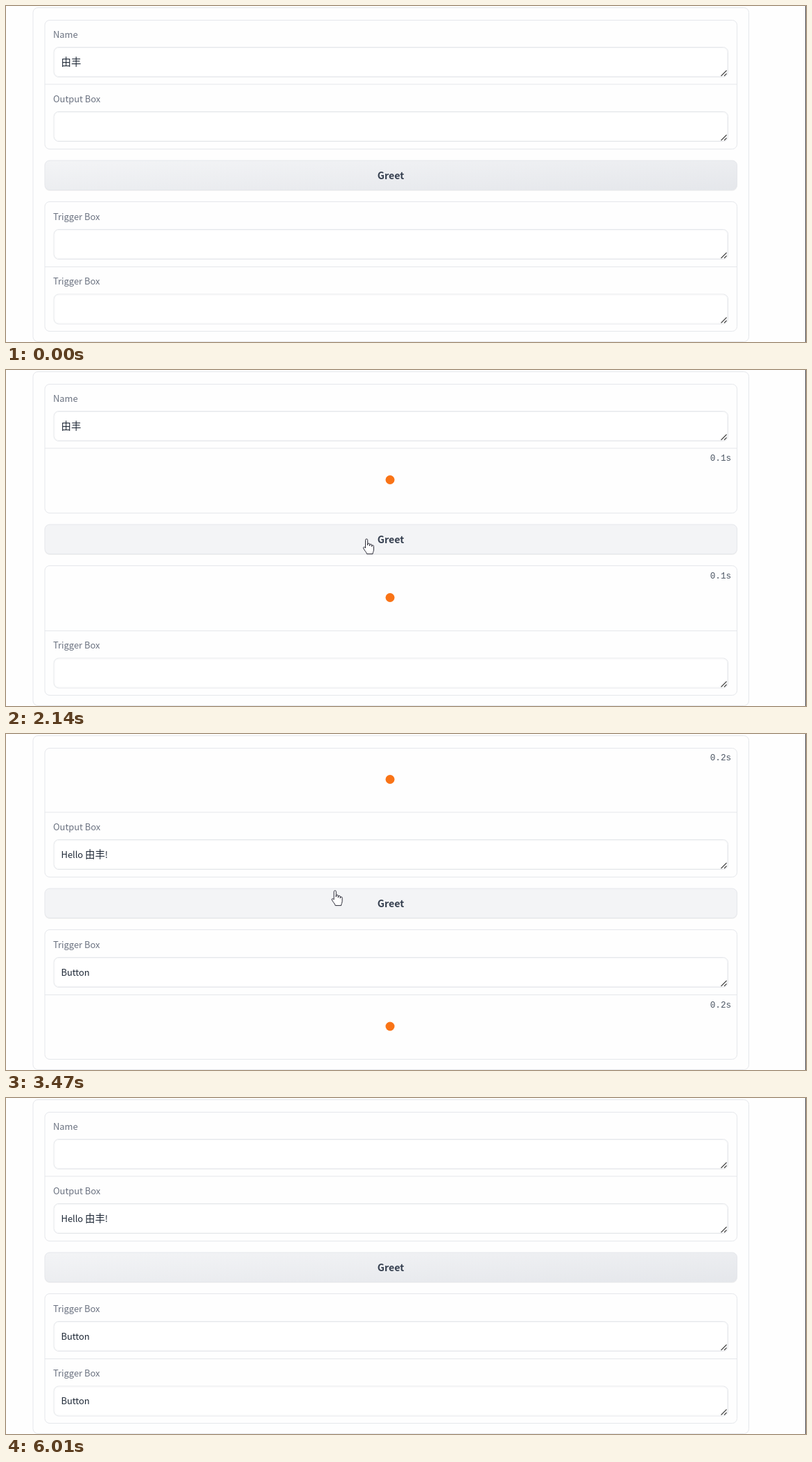
These frames come from a looping animation (1154x485 px, 6040 ms). An HTML page:

```html
<!DOCTYPE html>
<html lang="en">
<head>
<meta charset="utf-8">
<title>Greeting form</title>
<style>
  html, body { margin: 0; width: 100%; height: 100%; overflow: hidden; background: #fefefe; }
  svg { display: block; width: 1154px; height: 485px; }
  text { font-family: "Noto Sans CJK SC", "Noto Sans CJK JP", "Noto Sans CJK", sans-serif; font-size: 12.9px; fill: #1f2937; }
  .label { fill: #6b7280; }
  .cjk { font-size: 14.4px; }
  .greet { font-size: 14.2px; font-weight: 600; fill: #374151; text-anchor: middle; }
  .timer { font: 12.6px "Liberation Mono", monospace; fill: #4b5563; text-anchor: end; }
  .line { fill: none; stroke: #e5e7eb; }
  .field { fill: #fff; stroke: #e5e7eb; }
  .inner { fill: none; stroke: #f5f6f7; }
  .grip { fill: none; stroke: #444; stroke-width: 1.1; }
  .pointer { fill: #fff; stroke: #2c2c38; stroke-linejoin: round; }
</style>
</head>
<body>
<svg id="stage" viewBox="0 0 1154 485">
  <defs>
    <linearGradient id="shade" x1="0" y1="0" x2="1" y2="1">
      <stop offset="0" stop-color="#f3f4f6"/><stop offset="1" stop-color="#e5e7eb"/>
    </linearGradient>
  </defs>
</svg>
<script>
const LOOP = 6040;
const NAME = "由丰";
const svg = document.getElementById("stage");

function add(tag, attrs, parent = svg, text = "") {
  const el = document.createElementNS("http://www.w3.org/2000/svg", tag);
  for (const key in attrs) el.setAttribute(key, attrs[key]);
  el.textContent = text;
  parent.append(el);
  return el;
}
const rect = (x, y, width, height, attrs, parent) =>
  add("rect", { x, y, width, height, rx: 7, ...attrs }, parent);
const show = (el, on) => el.setAttribute("visibility", on ? "visible" : "hidden");
const between = (t, a, b) => t >= a && t < b;
const clamp = v => Math.max(0, Math.min(1, v));

// Page frame and groups
rect(39, 2.5, 1032.5, 482, { class: "line" });
rect(1153, 0, 1, 485, { fill: "#4a4a50", rx: 0 });
for (const [y, h, mid] of [[20.5, 186, 113], [282.5, 187, 376.5]]) {
  rect(56, y, 998.5, h, { class: "line" });
  add("path", { class: "line", d: `M56 ${mid}H1054` });
}

// Greet button
rect(56, 223.5, 998.5, 43.5, { fill: "#000", opacity: .05 });
const button = rect(56, 223, 998.5, 42.5, { stroke: "#e5e7eb" });
add("text", { class: "greet", x: 555, y: 250 }, svg, "Greet");

// A labelled text area that can be swapped for a loading view
function makeRow(label, top) {
  const form = add("g", {}), busy = add("g", {});
  add("text", { class: "label", x: 68, y: top - 13.6 }, form, label);
  const ring = rect(67, top - 1.5, 976, 46, { fill: "none", stroke: "#bfdbfe", "stroke-width": 3, rx: 9 }, form);
  rect(69, top, 972.5, 43, { class: "field" }, form);
  rect(70, top + 1, 970.5, 41, { class: "inner", rx: 6 }, form);
  const edge = rect(69, top, 972.5, 43, { fill: "none", stroke: "#93c5fd" }, form);
  add("path", { class: "grip", d: `M1031.5 ${top + 41.5}l8-8m-3.5 8l3.5-3.5` }, form);
  const value = add("text", { x: 79.5, y: top + 26.3 }, form);
  add("circle", { cx: 554, cy: top + 6, r: 6.5, fill: "#f97316" }, busy);
  const timer = add("text", { class: "timer", x: 1046, y: top - 21.3 }, busy);
  return { form, busy, ring, edge, value, timer };
}

function setRow(row, text, seconds, focus = 0) {
  const loading = seconds !== null;
  show(row.form, !loading);
  show(row.busy, loading);
  row.ring.setAttribute("opacity", focus * .5);
  row.edge.setAttribute("opacity", focus);
  if (loading) row.timer.textContent = seconds.toFixed(1) + "s";
  if (row.text === text) return;
  row.text = text;
  row.value.textContent = "";
  for (const part of text.split(NAME).flatMap((s, i) => i ? [NAME, s] : [s]))
    if (part) add("tspan", part === NAME ? { class: "cjk" } : {}, row.value, part);
}

const name = makeRow("Name", 59.5);
const output = makeRow("Output Box", 152.5);
const first = makeRow("Trigger Box", 322.5);
const second = makeRow("Trigger Box", 416);
const caret = rect(108.3, 72, 1.2, 18, { fill: "#111", rx: 0 });

// Pointer shapes, hotspot at 0,0
const pointers = {
  arrow: add("path", { class: "pointer", d: "M0 0V16.5L4 12.8 6.6 18.8 9 17.8 6.5 12H12Z" }),
  hand: add("path", { class: "pointer", d: "M-1.5 13V1.5a1.6 1.6 0 0 1 3.2 0V9V7.6a1.5 1.5 0 0 1 3 .2V10V8.8a1.5 1.5 0 0 1 3 .2V11V10.2a1.4 1.4 0 0 1 2.8 .4V15c0 3-1.5 4-1.5 6.5H.5c0-2-4.3-6-5-8.5c-.4-1.6 1.8-2 3 0Z" }),
  beam: add("path", { fill: "none", stroke: "#dedee2", d: "M-4-8.5h3l1 1l1-1h3M-4 8.5h3l1-1l1 1h3M0-7.5v15" })
};

// time, x, y
const track = [
  [310, 430, 500], [900, 293, 91], [1369, 293, 91], [1370, 293, 116],
  [1730, 520, 244], [2570, 520, 244], [2860, 508, 221], [3790, 462, 228],
  [4390, 461, 230], [5320, 461, 230], [5600, 430, 500]
];

function pointerAt(t) {
  const i = track.findIndex(k => k[0] > t);
  if (i < 1) return null;
  const [t0, x0, y0] = track[i - 1], [t1, x1, y1] = track[i];
  const u = (t - t0) / (t1 - t0), e = u * u * (3 - 2 * u);
  return [x0 + (x1 - x0) * e, y0 + (y1 - y0) * e];
}

function pointerKind(y) {
  if (between(y, 222.5, 266)) return "hand";
  return [59, 152, 322, 416].some(top => between(y, top, top + 60)) ? "beam" : "arrow";
}

function draw(t) {
  const firstRun = between(t, 2020, 3190) ? (t - 2020) * .00114 : null;
  const secondRun = between(t, 3190, 4390) ? (t - 3190) * .0008 : null;
  const focus = Math.min(clamp((t - 1050) / 140), clamp((2080 - t) / 140));

  setRow(name, t < 4390 ? NAME : "", secondRun, focus);
  setRow(output, t < 3190 ? "" : `Hello ${NAME}!`, firstRun);
  setRow(first, t < 3190 ? "" : "Button", firstRun);
  setRow(second, t < 4390 ? "" : "Button", secondRun);
  show(caret, between(t, 1080, 1610));

  const pos = pointerAt(t), kind = pos && pointerKind(pos[1]);
  for (const key in pointers) {
    show(pointers[key], key === kind);
    if (key === kind) pointers[key].setAttribute("transform", `translate(${pos})`);
  }
  button.setAttribute("fill", kind === "hand" ? "#f3f4f6" : "url(#shade)");
}

const start = performance.now();
function tick() {
  draw((performance.now() - start) % LOOP);
  requestAnimationFrame(tick);
}
tick();
</script>
</body>
</html>
```
